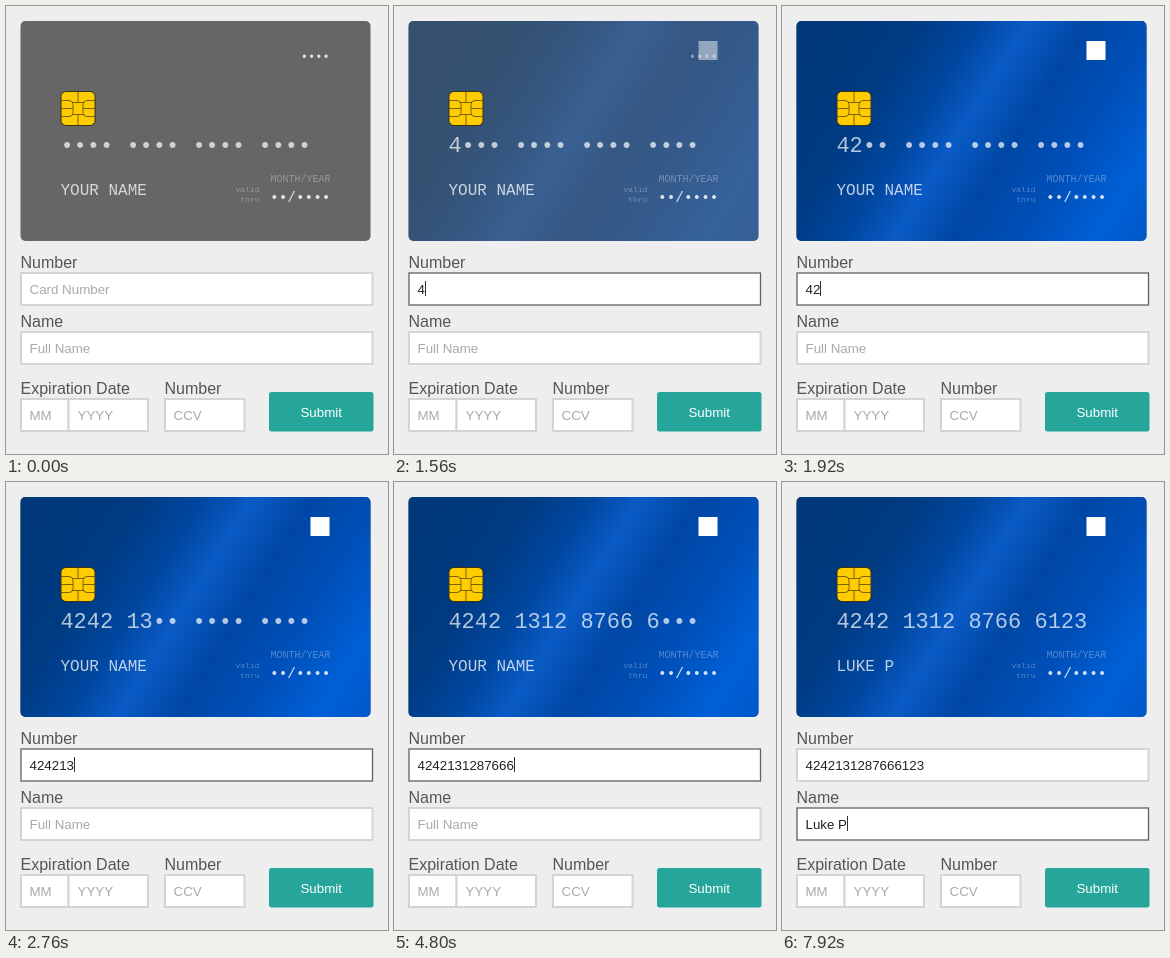
Write an HTML page that moves like this. It is 382 px wide and 448 px high and loops after 8 s.

```html
<!DOCTYPE html>
<html lang="en">
<head>
<meta charset="utf-8">
<title>Card form</title>
<style>
  html, body { margin: 0; width: 100%; height: 100%; overflow: hidden; background: #eee; }
  svg { display: block; width: 382px; height: 448px; }
  text { white-space: pre; font-family: "Liberation Sans", Arial, sans-serif; }
  .label { font-size: 16px; fill: #555; }
  .box { fill: #fff; stroke: #d3d4d6; stroke-width: 2; }
  .box.focus { stroke: #626262; stroke-width: 1.3; }
  .value, .hint, .button { font-size: 13.333px; }
  .value { fill: #222; }
  .hint { fill: #a9a9a9; }
  .button { fill: #fff; text-anchor: middle; }
  .card text { font-family: "Liberation Mono", "Courier New", monospace; fill: #fff; }
  .chip { fill: #fc0; stroke: #3a3212; stroke-width: 1; }
  .lines { fill: none; stroke: #6b5708; stroke-width: .9; }

  .show { animation: show 8s infinite; }
  .hide { animation: hide 8s infinite; }
  @keyframes show {
    0%, 18.12% { opacity: 0; animation-timing-function: ease; }
    23.1%, 100% { opacity: 1; }
  }
  @keyframes hide {
    0%, 18.12% { opacity: 1; animation-timing-function: ease; }
    23.1%, 100% { opacity: 0; }
  }
</style>
</head>
<body>
<svg viewBox="0 0 382 448">
  <defs>
    <linearGradient id="blue" gradientUnits="userSpaceOnUse" x1="14" y1="16" x2="364" y2="234">
      <stop offset="0" stop-color="#003878"/>
      <stop offset=".24" stop-color="#003a80"/>
      <stop offset=".38" stop-color="#0047a0"/>
      <stop offset=".48" stop-color="#0a5bc6"/>
      <stop offset=".6" stop-color="#0047a4"/>
      <stop offset=".74" stop-color="#004fb8"/>
      <stop offset=".89" stop-color="#0060d6"/>
      <stop offset="1" stop-color="#0058ca"/>
    </linearGradient>
  </defs>

  <g class="card">
    <rect x="14.5" y="15" width="350" height="220" rx="5" fill="#666"/>
    <rect class="show" x="14.5" y="15" width="350" height="220" rx="5" fill="url(#blue)"/>
    <rect class="show" x="304.5" y="35" width="19" height="19" fill="#fff"/>
    <g class="hide"><text x="294.8" y="55" font-size="12" opacity=".8">••••</text></g>

    <rect class="chip" x="55" y="85.5" width="34" height="34" rx="5"/>
    <path class="lines" d="M55 94.5h8q4 0 4 4v8q0 4-4 4h-8 M89 94.5h-8q-4 0-4 4v8q0 4 4 4h8
      M55 102.5h12 M77 102.5h12 M72 85.5v11 M72 119.500v-11 M66 96.500h12 M66 108.500h12"/>

    <text id="cardNumber" x="54.4" y="145.500" font-size="22" opacity=".7"></text>
    <text id="cardName" x="54.5" y="188.500" font-size="16" opacity=".74"></text>
    <g opacity=".32">
      <text x="253.5" y="185.500" font-size="8" text-anchor="end">valid</text>
      <text x="253.5" y="195.500" font-size="8" text-anchor="end">thru</text>
      <text x="264.5" y="175.500" font-size="10">MONTH/YEAR</text>
    </g>
    <text x="264" y="195.500" font-size="14.4" opacity=".82">••/••••</text>
  </g>

  <text class="label" x="14.5" y="261.5">Number</text>
  <rect class="box" id="numberBox" x="15" y="267" width="351.5" height="32"/>
  <text class="hint" id="numberHint" x="23.5" y="287.5">Card Number</text>
  <text class="value" id="number" x="23.5" y="287.5"></text>

  <text class="label" x="14.5" y="320.5">Name</text>
  <rect class="box" id="nameBox" x="15" y="326" width="351.5" height="32"/>
  <text class="hint" id="nameHint" x="23.5" y="346.5">Full Name</text>
  <text class="value" id="name" x="23.5" y="346.5"></text>

  <text class="label" x="14.5" y="387.5">Expiration Date</text>
  <text class="label" x="158.5" y="387.5">Number</text>
  <rect class="box" x="15" y="393" width="47.5" height="32"/>
  <rect class="box" x="62.5" y="393" width="79.5" height="32"/>
  <rect class="box" x="159" y="393" width="79.5" height="32"/>
  <text class="hint" x="23.5" y="413.5">MM</text>
  <text class="hint" x="71.5" y="413.5">YYYY</text>
  <text class="hint" x="167.5" y="413.5">CCV</text>

  <rect x="263" y="386" width="104.500" height="39.500" rx="2.500" fill="#26a69a"/>
  <text class="button" x="315.2" y="410.500">Submit</text>

  <rect id="caret" width="1" height="15" fill="#333"/>
</svg>
<script>
  const LOOP = 8000, BLINK = 600;
  const DIGITS = "4242131287666123", OWNER = "Luke P";
  const FOCUS = { number: 600, name: 6240 };

  // Times of each keystroke; the card follows the inputs, at times a little late.
  const rest = [2520, 2760, 3000, 3120, 3960, 4200, 4440, 4680, 4800, 5400, 5520];
  const numberKeys = [1440, 1800, 2040, 2160, ...rest, 5760];
  const cardKeys = [1560, 1800, 2040, 2280, ...rest, 5880];
  const nameKeys = [6600, 6960, 7320, 7440, 7560, 7920];
  const cardNameKeys = [6720, ...nameKeys.slice(1)];
  const events = [FOCUS.number, ...numberKeys, FOCUS.name, ...nameKeys];

  const $ = id => document.getElementById(id);
  const typed = (text, keys, t) => text.slice(0, keys.filter(k => k <= t).length);
  const show = (el, on) => el.setAttribute("visibility", on ? "visible" : "hidden");

  function setText(el, text) {
    if (el.textContent !== text) el.textContent = text;
  }

  function setField(id, text, focused) {
    setText($(id), text);
    show($(id + "Hint"), !text);
    $(id + "Box").classList.toggle("focus", focused);
  }

  function setCaret(t, id, text) {
    const last = Math.max(...events.filter(e => e <= t));
    const on = t >= FOCUS.number && Math.floor((t - last) / BLINK) % 2 === 0;
    show($("caret"), on);
    if (!on) return;
    const width = text ? $(id).getComputedTextLength() : 0;
    $("caret").setAttribute("x", Math.round(23.5 + width));
    $("caret").setAttribute("y", id === "name" ? 334 : 275);
  }

  function draw(t) {
    const number = typed(DIGITS, numberKeys, t);
    const name = typed(OWNER, nameKeys, t);
    const inName = t >= FOCUS.name;
    setField("number", number, t >= FOCUS.number && !inName);
    setField("name", name, inName);
    setCaret(t, inName ? "name" : "number", inName ? name : number);

    const full = typed(DIGITS, cardKeys, t).padEnd(16, "•");
    setText($("cardNumber"), full.match(/.{4}/g).join(" "));
    setText($("cardName"), typed(OWNER, cardNameKeys, t).toUpperCase() || "YOUR NAME");
  }

  const start = performance.now();
  function tick() {
    draw((performance.now() - start) % LOOP);
    requestAnimationFrame(tick);
  }
  tick();
</script>
</body>
</html>
```
